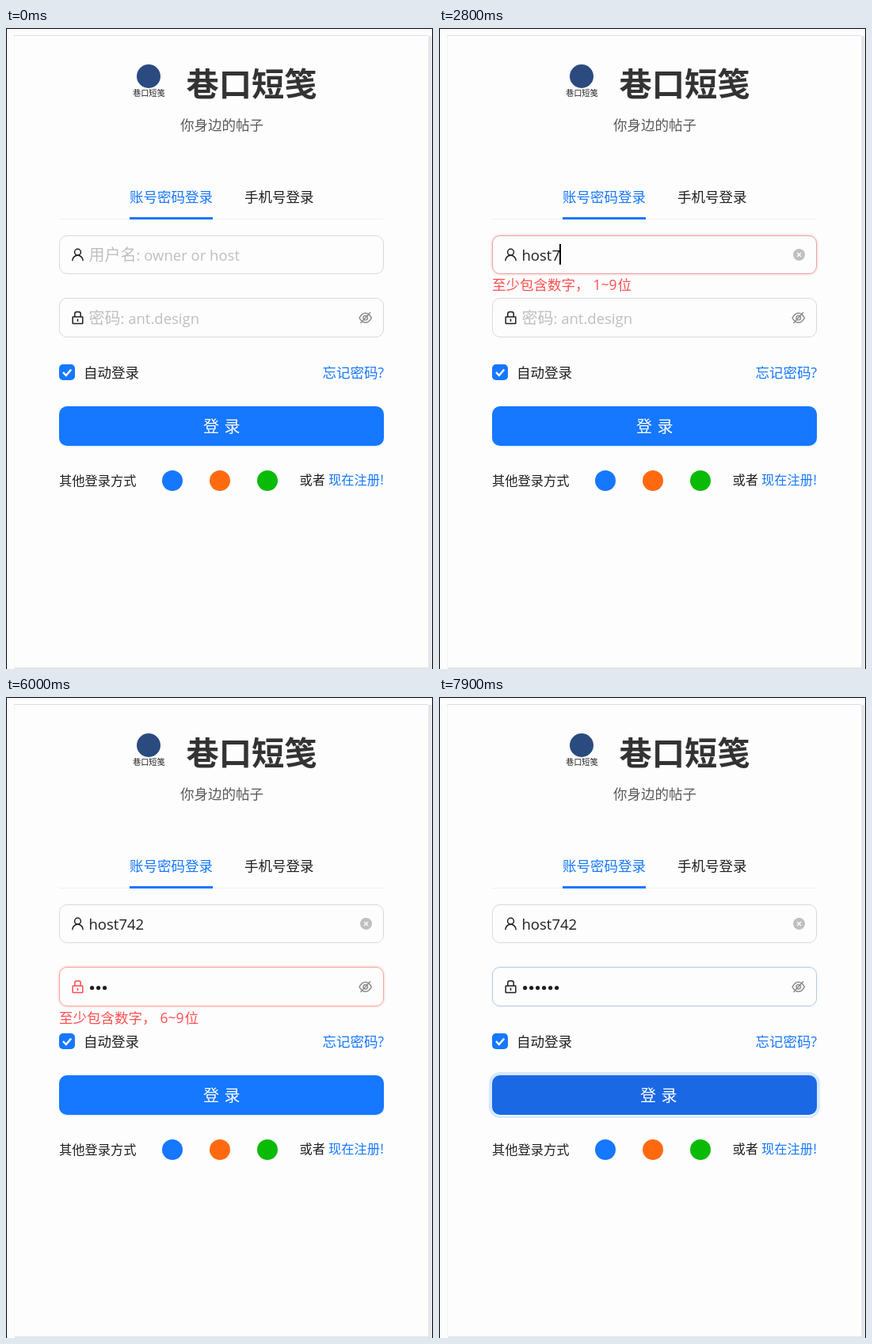
These frames come from a looping animation (539x810 px, 8000 ms). An HTML page:

```html
<!DOCTYPE html>
<html lang="zh-CN">
<head>
<meta charset="utf-8">
<title>登录</title>
<style>
  html, body { margin: 0; width: 100%; height: 100%; overflow: hidden; background: #fdfdfd; }
  svg { display: block; width: 100vw; height: 100vh; }
  text { font: 17.5px "Noto Sans CJK SC", "Noto Sans CJK", sans-serif; fill: #1f1f1f; white-space: pre; }
  .latin { font-family: "Open Sans", "Noto Sans", sans-serif; font-size: 18.5px; }
  .latin.small { font-size: 17.5px; }
  .field { font-size: 20px; }
  .hint, .hint .latin { fill: #bfbfbf; }
  .link { fill: #1677ff; }
  .foot { font-size: 16.25px; }
  .error { fill: #ff4d4f; }
  .icon { fill: none; stroke: #1f1f1f; stroke-width: 1.5; }
  .ring { fill: none; stroke-width: 2; }
  .edge { fill: #fdfdfd; stroke: #d9d9d9; }
</style>
</head>
<body>
<svg viewBox="0 0 539 810">
  <!-- window frame -->
  <rect width="539" height="810" fill="#fdfdfd"/>
  <path d="M10.5 10V808" stroke="#f4f4f7"/>
  <path d="M10 9.5H533" stroke="#dedee8"/>
  <rect x="533" y="10" width="5" height="800" fill="#e6e6ea"/>
  <rect x="11" y="808" width="527" height="2" fill="#e4e4e8"/>
  <path d="M.5 810V.5H538.5V810" fill="none" stroke="#000"/>

  <!-- heading -->
  <circle cx="180" cy="61" r="15" fill="#2b4a80"/>
  <text x="160" y="86" style="font-size:10.2px">巷口短笺</text>
  <text x="227.5" y="85.5" style="font-size:41.25px;font-weight:700;fill:#333">巷口短笺</text>
  <text x="220" y="128.5" style="fill:#595959">你身边的帖子</text>

  <!-- tabs -->
  <path d="M67 241.5H476" stroke="#f0f0f0"/>
  <rect x="156" y="239" width="105" height="3" fill="#1677ff"/>
  <text class="link" x="156" y="219.5">账号密码登录</text>
  <text x="301" y="219.5">手机号登录</text>

  <!-- account field -->
  <g id="account">
    <rect class="ring" x="66" y="261" width="412" height="51" rx="11.5"/>
    <rect class="edge" x="67.5" y="262.5" width="409" height="48" rx="9.5"/>
    <g class="icon">
      <circle cx="90.5" cy="283.2" r="3.9"/>
      <path d="M83.8 294.2C84 290 87 287.2 90.5 287.2S97 290 97.2 294.2"/>
    </g>
    <text class="field hint" x="104.5" y="294">用户名<tspan class="latin" x="164.5">: owner or host</tspan></text>
    <text class="latin value" x="104.5" y="294"></text>
    <g class="clear">
      <circle cx="454.5" cy="286.5" r="7.5" fill="#bfbfbf"/>
      <path d="M452 284l5 5m0-5l-5 5" stroke="#fff" stroke-width="1.2"/>
    </g>
    <rect class="caret" y="273" width="2" height="26"/>
    <text class="error" x="67" y="331">至少包含数字，<tspan class="latin small" x="194.5">1~9</tspan><tspan x="225.5">位</tspan></text>
  </g>

  <!-- password field -->
  <g id="secret">
    <rect class="ring" x="66" y="340" width="412" height="52" rx="11.5"/>
    <rect class="edge" x="67.5" y="341.5" width="409" height="49" rx="9.5"/>
    <g class="icon">
      <rect x="84.2" y="365" width="12.6" height="8.5" rx=".5"/>
      <path d="M86.8 365V361.2Q86.8 358.8 89.2 358.8H91.8Q94.2 358.8 94.2 361.2V365M90.5 367.5V371"/>
    </g>
    <text class="field hint" x="104.5" y="374">密码<tspan class="latin" x="144.5">: ant.design</tspan></text>
    <g class="dots" fill="#1f1f1f"></g>
    <g fill="none" stroke="#8c8c8c" stroke-width="1.4">
      <path d="M446 366.3Q449.5 360.3 453.7 360.3T461.4 366.3Q457.9 372.3 453.7 372.3T446 366.3ZM447.5 373L460 359.2"/>
      <circle cx="453.7" cy="366.3" r="2.8"/>
    </g>
    <rect class="caret" y="352" width="2" height="27"/>
    <text class="error" x="67" y="411.5">至少包含数字，<tspan class="latin small" x="194.5">6~9</tspan><tspan x="225.5">位</tspan></text>
  </g>

  <!-- options -->
  <rect x="67" y="425" width="20" height="20" rx="5" fill="#1677ff"/>
  <path d="M72 435l3.8 4 6.4-7.4" fill="none" stroke="#fff" stroke-width="2.4"/>
  <text x="98" y="441.5">自动登录</text>
  <text class="link" x="399.5" y="441.5">忘记密码<tspan class="latin small">?</tspan></text>

  <!-- submit -->
  <rect id="glow" x="63" y="474" width="418" height="58" rx="14" fill="#d6e8ff"/>
  <rect x="67" y="480" width="410" height="50" rx="10" fill="#e6f4ff"/>
  <rect id="button" x="67" y="478" width="410" height="50" rx="10"/>
  <text id="label" y="511" style="font-size:20px;fill:#fff"><tspan x="249">登</tspan><tspan x="275.5">录</tspan></text>

  <!-- other ways -->
  <text class="foot" x="67" y="578">其他登录方式</text>
  <circle cx="210" cy="572" r="13" fill="#1677ff"/>
  <circle cx="270" cy="572" r="13" fill="#ff6a10"/>
  <circle cx="330" cy="572" r="13" fill="#09bb07"/>
  <text class="foot" x="370.5" y="577">或者</text>
  <text class="foot link" x="407" y="577">现在注册!</text>
</svg>
<script>
const LOOP = 8000, STEP = 100, BLINK = 500, FADE = 200;

const TONES = {
  idle:  { edge: [217, 217, 217, 1], ring: [5, 145, 255, 0],  icon: '#1f1f1f' },
  focus: { edge: [64, 150, 255, 1],  ring: [5, 145, 255, .1], icon: '#1f1f1f' },
  error: { edge: [255, 158, 155, 1], ring: [255, 38, 5, .08], icon: '#ff4d4f' }
};

// keys: times of key presses; focus: [from, to]; error: fade in from/to, fade out from/to
const FIELDS = [
  {
    id: 'account', value: 'host742',
    keys: [1800, 2000, 2100, 2300, 2800, 3000, 3300],
    focus: [800, 4700],
    tones: [[0, 'idle'], [710, 'focus'], [1700, 'error'], [2790, 'focus'], [4690, 'idle']],
    error: [1800, 2100, 2800, 3300]
  },
  {
    id: 'secret',
    keys: [5100, 5300, 5500, 6600, 6800, 7000, 7400],
    length: 6,
    focus: [4700, 7900],
    tones: [[0, 'idle'], [4690, 'focus'], [5050, 'error'], [6900, 'focus'], [7800, 'idle']],
    error: [5100, 5500, 6950, 7400]
  }
];

const byId = id => document.getElementById(id);
const ramp = (t, from, to) => Math.min(1, Math.max(0, (t - from) / (to - from)));
const show = (node, on) => node.style.display = on ? '' : 'none';

for (const field of FIELDS) {
  const root = byId(field.id);
  for (const part of ['ring', 'edge', 'icon', 'hint', 'value', 'clear', 'dots', 'caret', 'error'])
    field[part + 'Node'] = root.querySelector('.' + part);
}

function paintTone(field, t) {
  const { tones } = field;
  const i = tones.findLastIndex(([start]) => start <= t);
  const to = TONES[tones[i][1]], from = TONES[tones[Math.max(0, i - 1)][1]];
  const k = 1 - (1 - ramp(t, tones[i][0], tones[i][0] + FADE)) ** 2;
  const mix = part => `rgba(${from[part].map((v, n) => v + (to[part][n] - v) * k)})`;
  field.edgeNode.style.stroke = mix('edge');
  field.ringNode.style.stroke = mix('ring');
  field.iconNode.style.stroke = to.icon;
}

function drawField(field, t) {
  const pressed = field.keys.filter(key => key <= t);
  const count = Math.min(pressed.length, field.length ?? Infinity);
  paintTone(field, t);
  show(field.hintNode, count === 0);

  let width = 8 * count;
  if (field.value) {
    field.valueNode.textContent = field.value.slice(0, count);
    width = count ? field.valueNode.getComputedTextLength() : 0;
    show(field.clearNode, count > 0);
  } else {
    field.dotsNode.innerHTML = Array.from({ length: count },
      (_, i) => `<circle cx="${108.6 + 8 * i}" cy="367.5" r="2.6"/>`).join('');
  }

  const [from, to] = field.focus;
  const awake = pressed.at(-1) ?? from;
  const lit = Math.floor((t - awake) / BLINK) % 2 === 0;
  show(field.caretNode, t >= from && t < to && lit);
  field.caretNode.setAttribute('x', Math.round(104 + width));

  const [inFrom, inTo, outFrom, outTo] = field.error;
  field.errorNode.style.opacity = ramp(t, inFrom, inTo) - ramp(t, outFrom, outTo);
}

function draw(now) {
  const t = Math.floor(now % LOOP / STEP) * STEP;
  for (const field of FIELDS) drawField(field, t);
  const clicked = t >= 7900;
  show(byId('glow'), clicked);
  byId('button').style.fill = clicked ? '#1b68e4' : '#1677ff';
  byId('label').setAttribute('transform', `translate(${clicked ? 5 : 0})`);
}

const start = performance.now();
function tick() {
  draw(performance.now() - start);
  requestAnimationFrame(tick);
}
tick();
</script>
</body>
</html>
```
